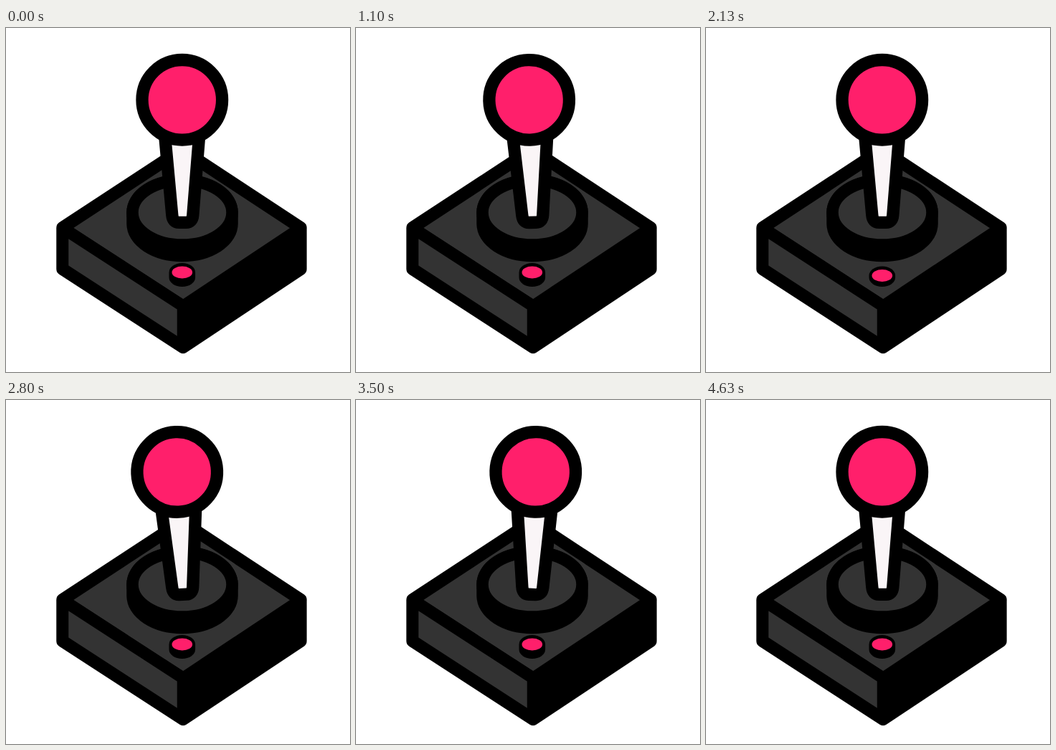
Write an HTML page that moves like this. It is 480 px wide and 480 px high and loops after 5010 ms.

```html
<!DOCTYPE html>
<html lang="en">
<head>
<meta charset="utf-8">
<title>Joystick</title>
<style>
  html, body { margin: 0; height: 100%; overflow: hidden; background: #fff; }
  svg { display: block; width: 100vw; height: 100vh; }
  .line { stroke: #000; stroke-width: 16.5; stroke-linejoin: round; }
  .bold { stroke-width: 17.3; }
  .grey { fill: #333; }
  .pink { fill: #ff1f6b; }
  .white { fill: #faf5f7; }
</style>
</head>
<body>
<svg viewBox="0 0 480 480">
  <!-- box -->
  <path class="line bold" d="M79 278.5 245.3 169.5 411 278.5V336.5L247 445.5 79 336.5z"/>
  <path class="line grey" d="M79 279 245.3 170 411 279 247 388z"/>
  <path class="line grey" d="M79 279 247 388V445L79 336z"/>
  <!-- collar -->
  <path class="line" d="M176.5 257a69.5 45 0 0 1 139 0v16a69.5 45 0 0 1-139 0z"/>
  <ellipse class="line grey" cx="246" cy="257.5" rx="69.5" ry="45"/>
  <!-- button -->
  <path id="side"/>
  <ellipse id="cap" class="pink" cx="245.8" rx="14.3" ry="8.5"/>
  <!-- stick -->
  <g id="stick">
    <path class="line bold white" d="M221.6 150 231.8 261Q232.7 271.4 241.5 271.4H251Q260 271.4 260.8 261L269.7 150z"/>
    <circle class="line bold pink" cx="245.8" cy="100.3" r="55.8"/>
  </g>
</svg>
<script>
  const LOOP = 5010, STEP = 50;
  const PRESS = 300, DEPTH = 4.5;
  const SWING = 1000, TILT = 5;
  const presses = [0, 333, 2000, 4000, 4333];
  const swings = [633, 2633];

  const side = document.getElementById('side');
  const cap = document.getElementById('cap');
  const stick = document.getElementById('stick');

  const ease = u => u * u * (3 - 2 * u);

  // Eased path through evenly spaced values, 0 outside the time span.
  function track(t, start, length, values) {
    const u = (t - start) / length * (values.length - 1);
    if (u <= 0 || u >= values.length - 1) return 0;
    const i = Math.floor(u);
    return values[i] + (values[i + 1] - values[i]) * ease(u - i);
  }

  const sum = (starts, t, length, values) =>
    starts.reduce((total, start) => total + track(t, start, length, values), 0);

  function draw(now) {
    // Twenty poses a second, shown for 30 and 70 ms in turn.
    const ms = now % LOOP;
    const t = (Math.floor(ms / 100) * 2 + (ms % 100 >= 30 ? 1 : 0)) * STEP;

    const y = 341 + sum(presses, t, PRESS, [0, DEPTH, 0]);
    side.setAttribute('d', `M227.5 ${y}a18.3 13 0 0 1 36.6 0V348a18.3 13 0 0 1-36.6 0z`);
    cap.setAttribute('cy', y);

    const angle = sum(swings, t, SWING, [0, -TILT, TILT, 0]);
    stick.setAttribute('transform', `rotate(${angle} 246 262)`);
  }

  function loop() {
    draw(performance.now());
    requestAnimationFrame(loop);
  }
  loop();
</script>
</body>
</html>
```
